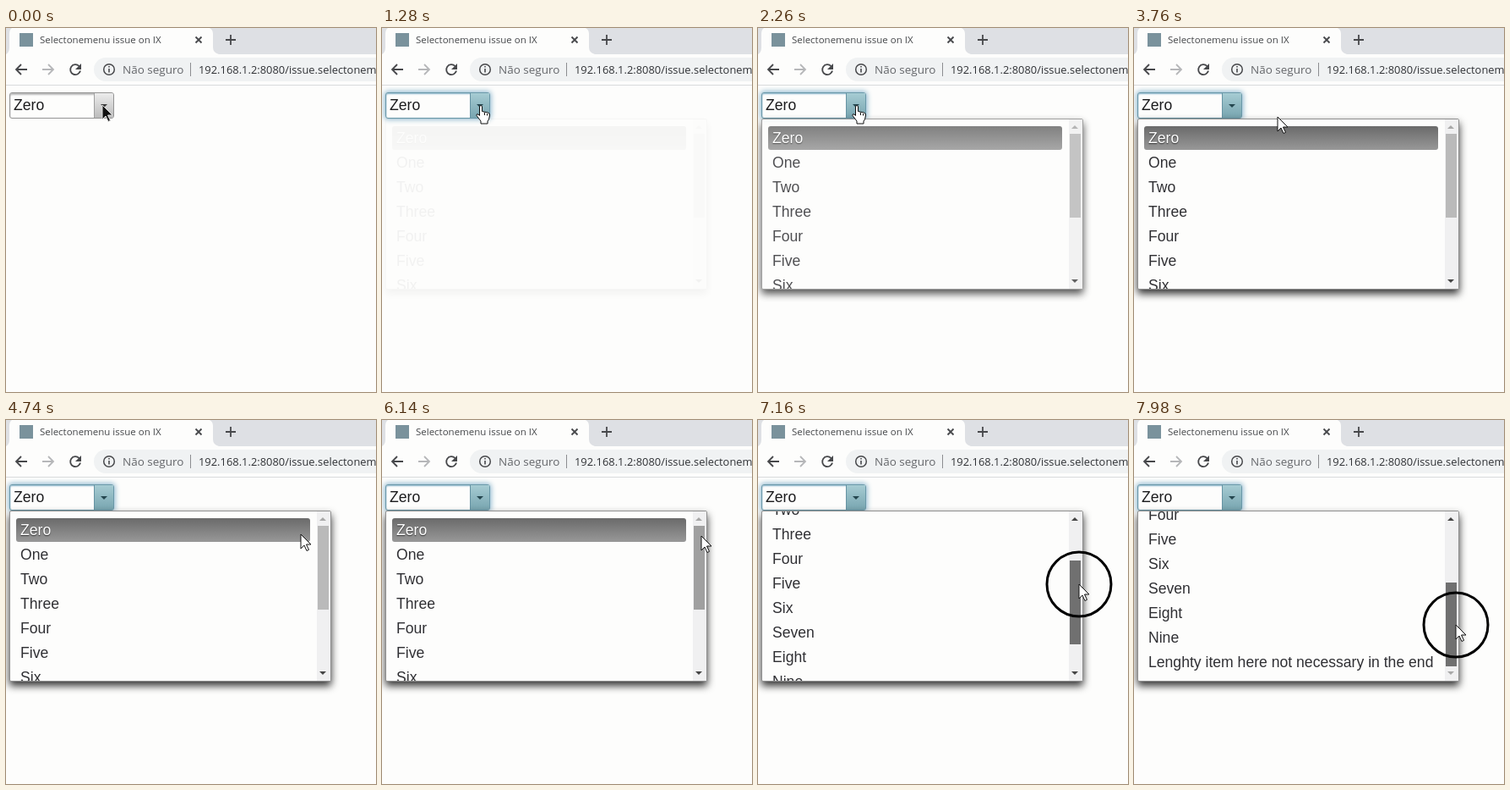
Write an HTML page that moves like this. It is 438 by 430 pixels and loops after 8 s.

```html
<!DOCTYPE html>
<html lang="en">
<head>
<meta charset="utf-8">
<title>Select menu demo</title>
<style>
  html, body { margin: 0; width: 100%; height: 100%; overflow: hidden; background: #fdfdfc; }
  body { position: relative; font: 17.6px/29px "Liberation Sans", Arial, sans-serif; color: #303034; }
  div, svg { position: absolute; box-sizing: border-box; }
  svg { left: 0; top: 0; overflow: hidden; }
  svg text { font-family: "Open Sans", sans-serif; }

  #field { left: 4px; top: 76px; width: 124px; height: 31px; border: 1px solid #949494; border-radius: 3px;
    background: #fdfdfc; box-shadow: inset 0 2px 2px #b8b8b8; color: #1c1c1e; overflow: hidden; }
  #field span { position: absolute; left: 4px; top: 0; }
  #button { right: 0; top: 0; width: 23px; height: 29px; border-left: 1px solid #a0a0a0;
    background: linear-gradient(#ececec, #bcbcbc); }
  #button::after { content: ""; position: absolute; left: 7px; top: 13px;
    border: 4px solid transparent; border-top-color: #3c3c3c; border-bottom: 0; }
  #field.focus { border-color: #6a98a8; overflow: visible;
    box-shadow: 0 0 6px 1px #85b2cb, inset 0 1px 2px #85b2cb; }
  .focus #button { border-color: #6693a3; background: linear-gradient(#a6ccd3, #78a5b0); }
  .focus #button::after { border-top-color: #24464f; }

  #menu { left: 4px; top: 107px; width: 381px; height: 202px; border: 1px solid #909090; border-radius: 2px;
    background: #fdfdfc; box-shadow: 0 5px 10px rgba(0, 0, 0, .8); }
  #view { left: 0; top: 0; width: 363px; height: 200px; overflow: hidden; }
  #list { left: 7px; top: 7px; width: 348px; }
  #list p { margin: 0; height: 29px; padding-left: 5px; white-space: nowrap; }
  #list p:first-child { margin: 1px 0; height: 28px; border-radius: 3px; color: #fff;
    text-shadow: 0 1px 1px #333; background: linear-gradient(#6a6a6a, #989898); line-height: 28px; }
  #bar { left: 363px; top: 0; width: 16px; height: 200px; background: #f0f0f1; }
  #thumb { left: 1px; top: 17px; width: 13px; height: 99px; }
  .tip { left: 3px; border: 4px solid transparent; }
  #up { top: 7px; border-top: 0; }
  #down { top: 189px; border-bottom: 0; }
</style>
</head>
<body>
<svg width="438" height="70" fill="none" stroke="#47484b" stroke-width="1.8">
  <g stroke="none">
    <path fill="#dee0e4" d="M0 0H438V31H0z"/>
    <path fill="#fdfdfc" d="M0 31Q4 29 4 23V7Q4 2 7 0H241Q245 2 245 7V23Q245 29 252 31V67H0zM245 31H438V67H245z"/>
    <path fill="#d9dadc" d="M0 67H438v1H0z"/>
    <rect x="16" y="6" width="16" height="16" fill="#7a929c"/>
    <rect x="104" y="35" width="360" height="28" rx="14" fill="#f0f2f3"/>
    <text x="40" y="18" font-size="11.5" fill="#45474a">Selectonemenu issue on IX</text>
    <text x="138" y="54" font-size="13.5" fill="#64666a">Não seguro</text>
    <text x="228" y="54" font-size="12.9" fill="#303236">192.168.1.2:8080/issue.selectonemenu</text>
  </g>
  <path d="M224.500 10.500l7 7m0-7l-7 7M260 14h12m-6-6v12"/>
  <path d="M25 49H12m6-6l-6 6 6 6"/>
  <path stroke="#b6b7b9" d="M43 49H56m-6-6l6 6-6 6"/>
  <path d="M86.500 45A6 6 0 1 0 88 50.500"/>
  <path fill="#47484b" stroke="none" d="M89 42v7h-7z"/>
  <circle cx="122" cy="49" r="6.300" stroke-width="1.500"/>
  <path stroke-width="1.600" d="M122 48v4.500M122 45v1.600"/>
  <path stroke="#8c8d90" stroke-width="1" d="M218.500 41v16"/>
</svg>

<div id="field"><span>Zero</span><div id="button"></div></div>
<div id="menu">
  <div id="view"><div id="list"></div></div>
  <div id="bar">
    <div id="up" class="tip"></div>
    <div id="thumb"></div>
    <div id="down" class="tip"></div>
  </div>
</div>

<svg width="438" height="430">
  <g id="pointer" stroke="#111" stroke-linejoin="round">
    <circle id="ring" r="38" fill="none" stroke="#000" stroke-width="3"/>
    <path id="arrow" d="M0 0v17l4-4 3 6.500 2.500-1.200-3-6.300h5.500z"/>
    <path id="hand" fill="#fff" d="M-1.500 1.500q1.500-2 3 0v6l7 1.500q2 .5 2 3l-1 5-1.500 2v3h-8v-3l-5-6.500q-.5-2.500 2-1.500l1.500 1.500zM4.500 9v3M7.500 10v2.500"/>
  </g>
</svg>

<script>
const LOOP = 8000, PRESS = 6480, PRESS_Y = 153, TRAVEL = 67, SCROLL_RATIO = 2;
const $ = id => document.getElementById(id);
const clamp = (v, lo, hi) => Math.min(hi, Math.max(lo, v));
const show = (id, on) => { $(id).style.display = on ? "" : "none"; };

// time, x, y of the pointer tip
const path = [
  [0, 114, 91], [100, 114, 91], [200, 117, 91], [3340, 117, 91],
  [3760, 170, 105], [4080, 240, 118], [4920, 379, 139], [6140, 378, 137],
  [PRESS, 378, PRESS_Y], [6700, 379, 156], [7160, 380, 194],
  [7440, 381, 222], [LOOP, 381, 243]
];

const items = ["Zero", "One", "Two", "Three", "Four", "Five", "Six", "Seven", "Eight", "Nine",
  "Lenghty item here not necessary in the end"];
$("list").innerHTML = items.map(name => `<p>${name}</p>`).join("");

function pointerAt(t) {
  const i = path.findIndex(key => key[0] > t);
  const [t0, x0, y0] = path[i - 1], [t1, x1, y1] = path[i];
  const p = (t - t0) / (t1 - t0);
  return [x0 + (x1 - x0) * p, y0 + (y1 - y0) * p];
}

function draw(t) {
  const [x, y] = pointerAt(t);
  const pressed = t >= PRESS;
  const dark = t < 120;
  const hand = !dark && x < 128;
  $("pointer").setAttribute("transform", `translate(${Math.round(x)} ${Math.round(y)})`);
  show("hand", hand);
  show("arrow", !hand);
  $("arrow").setAttribute("fill", dark ? "#111" : "#fff");
  $("arrow").setAttribute("stroke", dark ? "#ddd" : "#111");
  show("ring", pressed || (t >= 420 && t < 880));

  $("field").className = t >= 880 ? "focus" : "";
  const fade = clamp((t - 1040) / 1650, 0, 1);
  $("menu").style.opacity = (1 - Math.cos(Math.PI * fade)) / 2;

  const offset = pressed ? Math.round(clamp(y - PRESS_Y, 0, TRAVEL)) : 0;
  $("thumb").style.transform = `translateY(${offset}px)`;
  $("thumb").style.background = pressed ? "#707070" : t >= 5020 ? "#a0a0a0" : "#bababa";
  $("list").style.transform = `translateY(${-offset * SCROLL_RATIO}px)`;
  $("up").style.borderBottomColor = offset > 0 ? "#454545" : "#a8a8a8";
  $("down").style.borderTopColor = offset < TRAVEL ? "#454545" : "#a8a8a8";
}

function tick() {
  draw(performance.now() % LOOP);
  requestAnimationFrame(tick);
}
tick();
</script>
</body>
</html>
```
